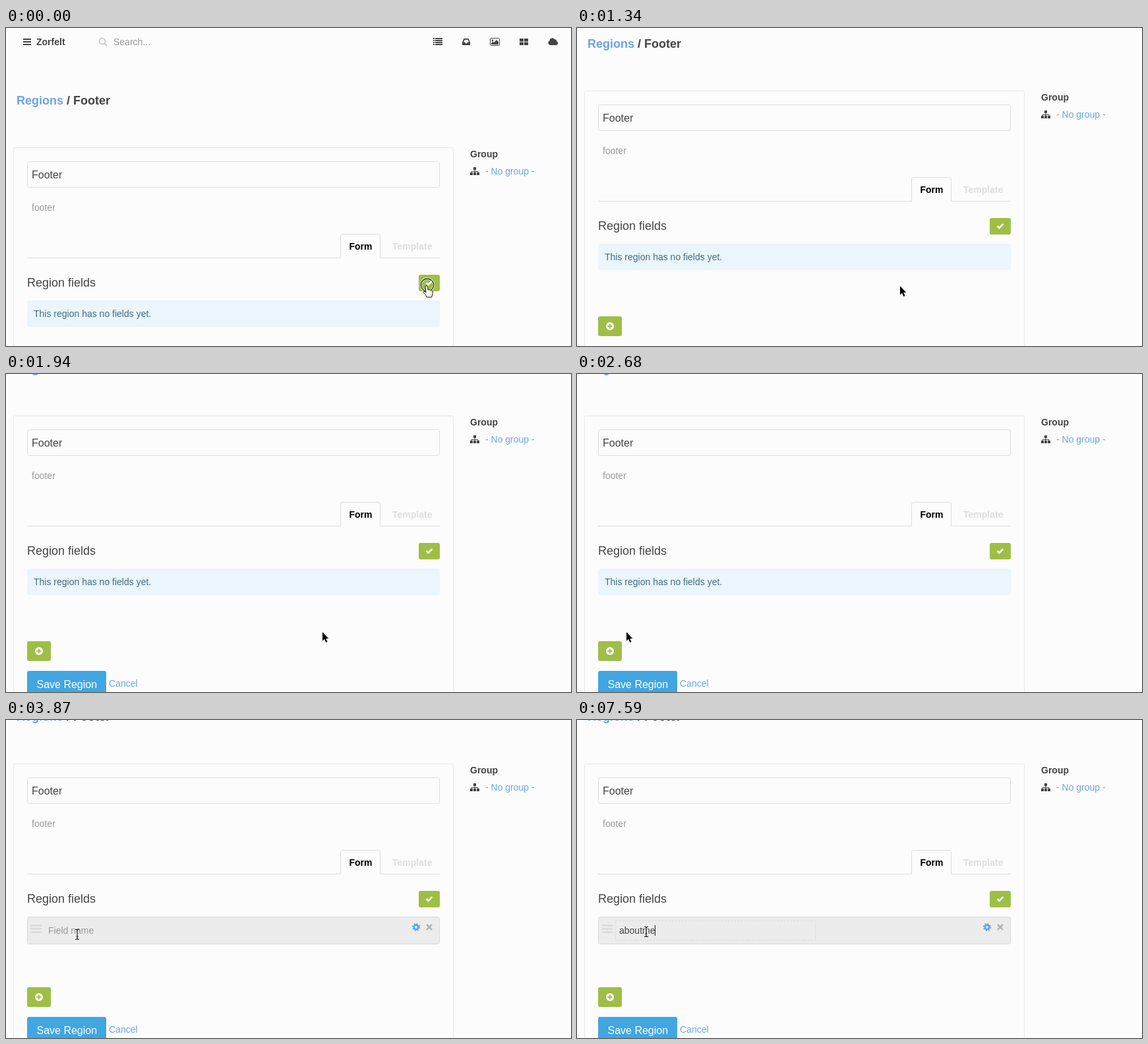
Recreate the animation shown at these times as an HTML page. Size 857x482 px, loop 8000 ms.

```html
<!DOCTYPE html>
<html lang="en">
<head>
<meta charset="utf-8">
<title>Region editor</title>
<style>
  html, body { margin: 0; width: 100%; height: 100%; overflow: hidden; background: #fcfcfc; }
  svg { display: block; width: 857px; height: 482px; }
  text { font: 14px "Liberation Sans", Arial, sans-serif; fill: #444; white-space: pre; }
  .b { font-weight: bold; }
  .m { font-size: 16px; }
  .l { font-size: 18px; }
  .link { fill: #6ba4e3; }
  .mute { fill: #999; }
  .ink { fill: #444; }
  .green { fill: #9fbe47; }
  .line { fill: none; stroke: #ddd; }
  .white { fill: none; stroke: #fff; stroke-width: 2.4; }
  .halo { fill: none; stroke: #fff; stroke-width: 3; stroke-opacity: .8; }
  .dark { fill: none; stroke: #111; stroke-width: 1.2; }
</style>
</head>
<body>
<svg viewBox="0 0 857 482">
  <g id="page">
    <!-- top bar -->
    <path d="M26 17h12M26 21h12M26 25h12" stroke="#444" stroke-width="2"/>
    <text class="b" x="46" y="26">Zorfelt</text>
    <g fill="none" stroke="#ccc" stroke-width="2">
      <circle cx="146" cy="20" r="4.4"/>
      <path d="M149.300 23.300l4 4"/>
    </g>
    <text class="mute" x="163" y="26">Search...</text>
    <g stroke="#444" stroke-width="2">
      <path d="M648 16h2M648 19h2M648 22h2M648 25h2M651 16h11M651 19h11M651 22h11M651 25h11"/>
    </g>
    <path class="ink" fill-rule="evenodd" d="M694.500 16h7l2.500 5.500V26h-12v-4.500zM695.700 17.800l-1.700 3.700h2.300l1 2h1.700l1-2h2.300l-1.700-3.700z"/>
    <rect x="734.500" y="15.500" width="14" height="11" rx="1" fill="none" stroke="#444"/>
    <circle class="ink" cx="738" cy="19" r="1.400"/>
    <path class="ink" d="M736 25v-2l2.500-2.500 1.500 1.500 4-4 3 3v4z"/>
    <path class="ink" d="M779 16h6v4.500h-6zM786 16h6v4.500h-6zM779 21.500h6V26h-6zM786 21.500h6V26h-6z"/>
    <path class="ink" d="M825.500 26a3.500 3.500 0 0 1-1-6.700a4.200 4.200 0 0 1 7.700-2.100a2.500 2.500 0 0 1 3 2.800a3.100 3.100 0 0 1-1 6z"/>

    <text class="l b" x="16" y="116"><tspan class="link">Regions</tspan> / Footer</text>

    <!-- group column -->
    <text class="b" x="704" y="196">Group</text>
    <path class="ink" d="M709 211h4v4h-4zM704 219h4v4h-4zM709 219h4v4h-4zM714 219h4v4h-4z"/>
    <path d="M711 214v6M706 220v-2.500h10v2.500" fill="none" stroke="#444"/>
    <text class="link" x="727" y="222">- No group -</text>

    <!-- panel -->
    <rect x="11.500" y="181.500" width="667" height="700" rx="2" fill="none" stroke="#e8e8e8"/>
    <rect x="32.500" y="202.500" width="625" height="39" rx="3" class="line"/>
    <text class="m" x="39" y="228">Footer</text>
    <text class="mute" x="39" y="277">footer</text>
    <path class="line" d="M32 348.500h475.500V315.500q0-3 3-3h54q3 0 3 3v33H658"/>
    <text class="b" x="520.500" y="336" style="fill:#000">Form</text>
    <text class="b" x="586" y="336" style="fill:#ddd">Template</text>
    <text class="l" x="32" y="392">Region fields</text>
    <rect class="green" x="626" y="374" width="32" height="25" rx="3"/>
    <path class="white" d="M637.500 386.200l3 3 5.800-6"/>

    <g id="alert">
      <rect x="32" y="413" width="626" height="40" rx="4" fill="#ebf5fc"/>
      <text x="42" y="438" style="fill:#456b85">This region has no fields yet.</text>
    </g>

    <g id="row">
      <rect x="32.500" y="413.500" width="625" height="41" rx="3" fill="#ececec" stroke="#dadada"/>
      <path d="M38 426.500h16M38 431.500h16M38 436.500h16" stroke="#d6d6d6" stroke-width="2"/>
      <rect id="focus" x="58.500" y="419.500" width="303" height="29" fill="none" stroke="#dadada" stroke-dasharray="3 2"/>
      <text id="field" x="64" y="439"></text>
      <path id="caret" d="M0 426v16" stroke="#222"/>
      <g transform="translate(622 429)" fill="none" stroke="#5fa6e5">
        <circle r="3.200" stroke-width="2.600"/>
        <circle r="5" stroke-width="2.200" stroke-dasharray="1.963"/>
      </g>
      <path d="M638 425l8 8M646 425l-8 8" stroke="#b4b4b4" stroke-width="2.600"/>
    </g>

    <g id="foot">
      <rect class="green" x="32" y="523" width="36" height="30" rx="3"/>
      <circle cx="50" cy="538" r="6" fill="#fff"/>
      <path d="M46.500 538h7M50 534.500v7" stroke="#9fbe47" stroke-width="2"/>
      <rect x="32" y="568" width="120" height="40" rx="3" fill="#41a6e1"/>
      <text class="m" x="46.500" y="594" style="fill:#fff">Save Region</text>
      <text class="link" x="156" y="592">Cancel</text>
    </g>
  </g>

  <g id="mouse">
    <g id="ring">
      <circle class="halo" cx="1" cy="-1.500" r="9.700"/>
      <circle class="dark" cx="1" cy="-1.500" r="9.700"/>
    </g>
    <path id="arrow" d="M0 0V13.500l3-2.800 2.400 5.300 2.200-1-2.400-5H9.300z" fill="#000" stroke="#fff" stroke-width="1.200" paint-order="stroke"/>
    <path id="hand" fill="#fff" stroke="#111" d="M-2 1.500Q-2-.500-.300-.500Q1.300-.500 1.500 1.500L2.200 6Q4 4.800 5 6.300Q6.800 5.600 7.300 7.200Q9 7 9 9V12L7.500 17H0L-1.500 13.500L-5 9.500Q-5 7.500-3 8.300L-1 10z"/>
    <g id="beam">
      <path class="halo" d="M0-6.500v13"/>
      <path class="dark" d="M-3-7.500h2l1 1 1-1h2M-3 7.500h2l1-1 1 1h2M0-6.500v13M-1.500 3h3"/>
    </g>
  </g>
</svg>
<script>
const LOOP = 8000;

// time, x, y, pointer shape, ring shown
const mouse = [
  [0, 638, 391, "hand", 1],
  [150, 611, 395, "arrow", 0],
  [290, 526, 396, "arrow", 0],
  [440, 490, 391, "arrow", 0],
  [1490, 485, 391, "arrow", 0],
  [1790, 480, 391, "arrow", 0],
  [2390, 372, 391, "arrow", 0],
  [2540, 168, 392, "arrow", 0],
  [2680, 75, 391, "arrow", 0],
  [2830, 58, 407, "hand", 0],
  [2980, 48, 416, "hand", 0],
  [3130, 44, 417, "hand", 0],
  [3270, 44, 417, "hand", 1],
  [3570, 58, 414, "hand", 0],
  [3720, 104, 356, "arrow", 0],
  [3870, 108, 325, "beam", 0],
  [4010, 105, 321, "beam", 0],
  [4160, 105, 321, "beam", 1],
  [4310, 105, 321, "beam", 0]
];

// time, page offset
const scroll = [[0, 0], [1340, -86], [1790, -108], [1940, -118], [3420, -115]];

// time, typed text, caret shown
const typing = [
  [0, "", 0],
  [4310, "", 1],
  [4900, "", 0],
  [5200, "a", 1],
  [5490, "ab", 1],
  [5940, "abo", 1],
  [6240, "abou", 1],
  [6690, "about", 1],
  [7140, "about", 0],
  [7290, "aboutm", 1],
  [7590, "aboutme", 1]
];

const $ = id => document.getElementById(id);
const show = (id, on) => { $(id).style.display = on ? "" : "none"; };
const move = (id, x, y) => $(id).setAttribute("transform", `translate(${x} ${y})`);
const at = (steps, t) => steps.findLast(s => s[0] <= t);

function draw(t) {
  const [, x, y, shape, ring] = at(mouse, t);
  const [, value, caret] = at(typing, t);
  const added = t >= 3420;

  move("page", 0, at(scroll, t)[1]);
  move("foot", 0, added ? -3 : 0);
  show("alert", !added);
  show("row", added);
  show("focus", t >= 4160);

  const field = $("field");
  field.textContent = value || "Field name";
  field.style.fill = value ? "#444" : "#999";
  show("caret", caret);
  if (caret) move("caret", value ? Math.round(64 + field.getComputedTextLength()) + .5 : 64.5, 0);

  move("mouse", x, y);
  show("ring", ring);
  for (const id of ["arrow", "hand", "beam"]) show(id, id === shape);
}

const start = performance.now();
function tick() {
  draw((performance.now() - start) % LOOP);
  requestAnimationFrame(tick);
}
tick();
</script>
</body>
</html>
```
